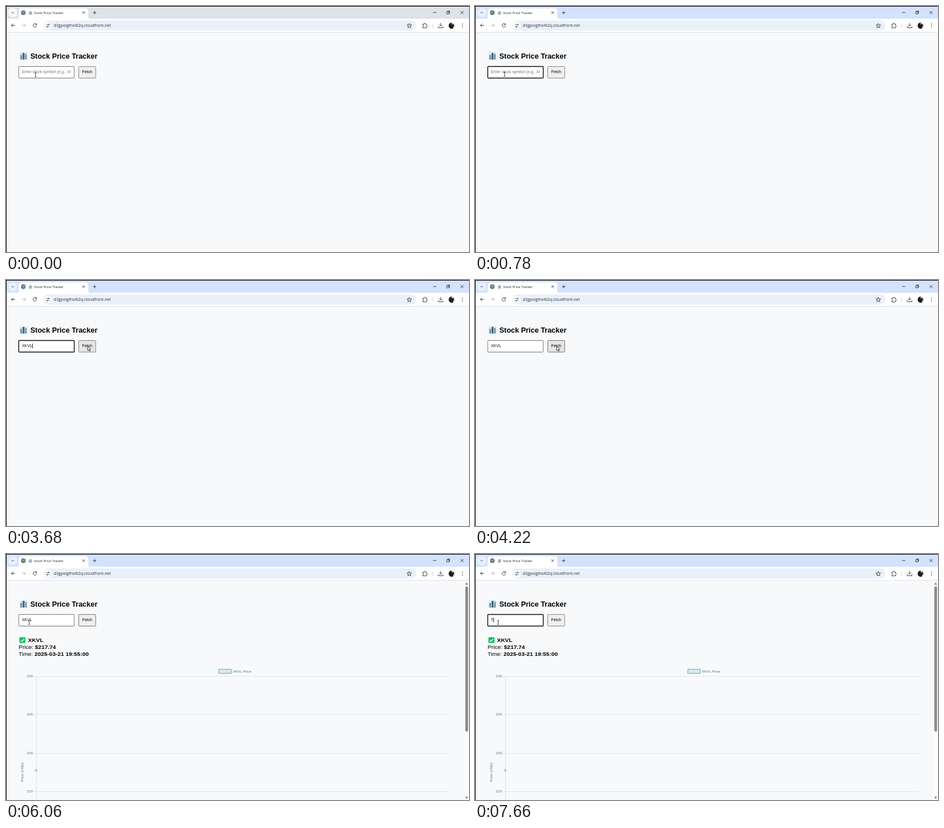
These frames come from a looping animation (799x425 px, 8 s). An HTML page:

```html
<!DOCTYPE html>
<html lang="en">
<head>
<meta charset="utf-8">
<title>Stock Price Tracker</title>
<style>
html, body { margin: 0; width: 100%; height: 100%; overflow: hidden; background: #f8f9fb; }
svg { display: block; }
text { font-family: "Liberation Sans", Arial, sans-serif; white-space: pre; }
.ui { font-family: "Open Sans", "Noto Sans", sans-serif; }
.field { font-size: 6.93px; }
.result { font-size: 9.98px; }
.chart { font-size: 6.24px; fill: #666; }
.b { font-weight: bold; }
.icon { fill: none; stroke: #3c4043; stroke-width: 1; }
</style>
</head>
<body>
<svg width="799" height="425" viewBox="0 0 799 425">
  <defs>
    <clipPath id="fieldClip"><rect x="27" y="106" width="85" height="18"/></clipPath>
    <clipPath id="avatarClip"><circle cx="769.3" cy="34" r="5.4"/></clipPath>
    <g id="bars">
      <rect width="13" height="13" rx="1" fill="#dce6ec"/>
      <path d="M1 4.5h3v8H1z" fill="#6f9a96"/>
      <path d="M5 1h3.2v11.5H5z" fill="#39648c"/>
      <path d="M9.2 3h2.8v9.5H9.2z" fill="#8197a8"/>
    </g>
  </defs>

  <!-- tab strip -->
  <rect id="strip" width="799" height="23"/>
  <rect id="tabSearch" x="4" y="4" width="15" height="15" rx="5"/>
  <path class="icon" d="M9.5 10.5l2 2 2-2"/>
  <path d="M18 22.5q4 0 4-4V9q0-5 5-5H137q5 0 5 5v9.5q0 4 4 4z" fill="#fff"/>
  <circle cx="30" cy="11.5" r="3.9" fill="#55595d"/>
  <path d="M27.4 10.2l2.4 1.1-.6 2.4M30.5 8.5l.4 1.8 2 .5M31 14l1.6-1.5" fill="none" stroke="#fff" stroke-width=".9"/>
  <use href="#bars" transform="translate(39 8.5) scale(.5)" opacity=".7"/>
  <text class="ui" x="48.6" y="13.8" font-size="5.8" fill="#1f1f1f">Stock Price Tracker</text>
  <path class="icon" d="M131.9 9.4l4 4m0-4l-4 4M150.2 11.5h5.6M153 8.7v5.6"/>
  <path class="icon" stroke-width=".8" d="M737 11.2h5.5M784.5 8.8l5 5m0-5l-5 5M760.6 9.8h3.8v3.8h-3.8zM762 9.6v-1h3.6v3.7h-1"/>

  <!-- toolbar -->
  <rect y="22" width="799" height="23" fill="#fff"/>
  <rect y="45" width="799" height="1" fill="#dde1e6"/>
  <path class="icon" d="M15.4 33.5H9.4M12.2 30.6l-2.9 2.9 2.9 2.9"/>
  <path class="icon" style="stroke:#b4b7ba" d="M27.6 33.5h6M30.8 30.6l2.9 2.9-2.9 2.9"/>
  <path class="icon" d="M52.3 31.7a3 3 0 1 0 .5 2.6M52.8 30v2.4h-2.4"/>
  <rect x="64" y="25" width="644" height="17.5" rx="8.7" fill="#e9f0f9"/>
  <circle cx="72.2" cy="33.8" r="6.4" fill="#fff"/>
  <path class="icon" d="M69.3 32h2.4M74 35.7h1.4M69.3 35.7h1"/>
  <circle class="icon" cx="73.8" cy="32" r="1"/>
  <circle class="icon" cx="71.5" cy="35.7" r="1"/>
  <text class="ui" x="82.3" y="36.3" font-size="6.95" fill="#2c3136">d3gpoigths4t2q.cloudfront.net</text>
  <path class="icon" stroke-width=".9" d="M696 30.1l1.1 2.6 2.8.2-2.1 1.9.6 2.7-2.4-1.5-2.4 1.5.6-2.7-2.1-1.9 2.8-.2z"/>
  <path class="icon" d="M719.3 31.3h2.2q0-1.6 1.3-1.6t1.3 1.6h1.6v2.1q1.5.1 1.5 1.2t-1.5 1.2v2h-6.4v-2q1.4-.1 1.4-1.3t-1.4-1.3z"/>
  <path d="M736.5 30v8" stroke="#cfdcf0"/>
  <path class="icon" d="M750 29.4v5.2M747.6 32.4l2.4 2.4 2.4-2.4M746 35.2v2.4h8v-2.4"/>
  <g clip-path="url(#avatarClip)">
    <rect x="763" y="28" width="13" height="13" fill="#c9c6c1"/>
    <path d="M763 28h6v4l3-1q2 3 0 5l-2 5h-7z" fill="#1d1d1f"/>
  </g>
  <g fill="#3c4043"><circle cx="787.7" cy="30.8" r=".8"/><circle cx="787.7" cy="33.8" r=".8"/><circle cx="787.7" cy="36.8" r=".8"/></g>

  <!-- page -->
  <use href="#bars" x="23.7" y="80"/>
  <text class="b" x="42" y="90.8" font-size="12.48">Stock Price Tracker</text>
  <rect id="field" x="22" y="104.5" width="95.7" height="20" rx="1" fill="#fff"/>
  <g clip-path="url(#fieldClip)">
    <rect id="selection" x="27.4" y="110" width="18" height="8" fill="#1a73d8"/>
    <text id="value" class="field" x="27.5" y="116.4"></text>
  </g>
  <path id="caret" stroke="#000" stroke-width=".9"/>
  <rect id="button" x="125.5" y="104.5" width="29.3" height="20" rx="1"/>
  <text class="field" x="140.2" y="116.4" text-anchor="middle">Fetch</text>

  <g id="results">
    <rect x="23.2" y="143.8" width="10.4" height="10" rx="1.2" fill="#12c264"/>
    <path d="M25.7 148.9l2 2.1 3.7-4.3" fill="none" stroke="#fff" stroke-width="1.2"/>
    <text class="result b" x="38" y="152.2">XKVL</text>
    <text class="result" x="21.8" y="163.9">Price: <tspan class="b">$217.74</tspan></text>
    <text class="result" x="21.8" y="175.5">Time: <tspan class="b">2025-03-21 19:55:00</tspan></text>
    <rect x="367.3" y="199.3" width="21.4" height="7" fill="#d9eaed" stroke="#80c3c8" stroke-width="1.5"/>
    <text class="chart" x="391.5" y="204.8">XKVL Price</text>
    <g id="grid"></g>
    <path d="M52.5 211v214" stroke="#dfe0e2"/>
    <text class="chart" text-anchor="middle" transform="translate(30.4 377) rotate(-90)">Price (USD)</text>
    <circle cx="52.2" cy="373.7" r="1.6" fill="#d9eaed" stroke="#5cb9ba"/>
    <rect x="791" y="46" width="8" height="379" fill="#fcfcfc"/>
    <rect x="792.6" y="56" width="4.8" height="251" rx="2.4" fill="#8b8b8b"/>
    <path d="M792.5 53l2.5-4 2.5 4zM792.5 419.3l2.5 4 2.5-4z" fill="#858585"/>
  </g>

  <path id="beam" fill="none" stroke="#333" stroke-width=".9"/>
  <path id="arrow" d="M0 0v7.4l1.8-1.6 1.2 2.6 1.2-.6-1.2-2.5h2.3z" fill="#fff" stroke="#111" stroke-width=".8"/>
  <path d="M0 .5H799M.5 0V425" stroke="#000"/>
</svg>
<script>
const LOOP = 8000;
const $ = id => document.getElementById(id);
const set = (id, attrs) => { for (const k in attrs) $(id).setAttribute(k, attrs[k]); };
const show = (id, on) => set(id, { visibility: on ? 'visible' : 'hidden' });
const between = (t, a, b) => t >= a && t < b;
// Value of the last [time, ...values] step already reached
const stepAt = (steps, t) => steps.filter(s => s[0] <= t).pop().slice(1);

const hint = 'Enter stock symbol (e.g., XKVL)';
const typed = [[0, ''], [1730, 'X'], [1970, 'XK'], [2100, 'XKV'], [2630, 'XKVL'], [7660, 'T']];
const pointer = [
  [0, 51, 118.5], [780, 51, 117.5],
  [3160, 58, 118], [3290, 84, 118], [3420, 113, 118], [3550, 134, 116], [3680, 141, 114.5],
  [5150, 128, 115], [5280, 82, 118], [5410, 40, 121],
  [5560, 37, 120.5], [5690, 36, 119.5], [5810, 37, 118.5], [5930, 39, 118], [6060, 40, 118]
];

for (let i = 0; i < 4; i++) {
  const y = 211 + 66.25 * i;
  $('grid').innerHTML += `<path d="M47 ${Math.round(y) + .5}H766" stroke="#e3e4e6"/>
    <text class="chart" x="46.5" y="${y + 2.2}" text-anchor="end">${230 - 5 * i}</text>`;
}

function render(t) {
  const active = t >= 120;
  set('strip', { fill: active ? '#d3e3fd' : '#dee3ea' });
  set('tabSearch', { fill: active ? '#e8f0fe' : '#f8fafc' });

  const [text] = stepAt(typed, t);
  const selected = between(t, 6470, 7660);
  const focused = between(t, 520, 3940) || t >= 6340;
  set('field', { stroke: focused ? '#101010' : '#767676', 'stroke-width': focused ? 1.4 : 1 });
  $('value').textContent = text || hint;
  set('value', { fill: selected ? '#fff' : text ? '#111' : '#757575' });
  show('selection', selected);
  show('caret', focused && text && !selected);
  set('caret', { d: `M${27.9 + (text ? $('value').getComputedTextLength() : 0)} 110v8` });

  const [x, y] = stepAt(pointer, t);
  const overField = x < 118, overButton = x > 125;
  const pressed = between(t, 3940, 4220);
  set('button', {
    fill: pressed ? '#f5f5f5' : overButton ? '#e5e5e5' : '#efefef',
    stroke: between(t, 3940, 6340) ? '#666' : '#7d7977',
    'stroke-width': .9
  });

  // The beam fades to its serifs while keys are pressed
  const stem = between(t, 1730, 3160) ? '' : `M${x} ${y - 3.5}v7`;
  show('beam', overField);
  set('beam', { d: `${stem}M${x - 1.5} ${y - 3}h3M${x - 1.5} ${y + 3.8}h3` });
  show('arrow', !overField);
  set('arrow', { transform: `translate(${x} ${y})` });

  show('results', t >= 4620);
}

function frame(now) {
  render(now % LOOP);
  requestAnimationFrame(frame);
}
render(0);
requestAnimationFrame(frame);
</script>
</body>
</html>
```
